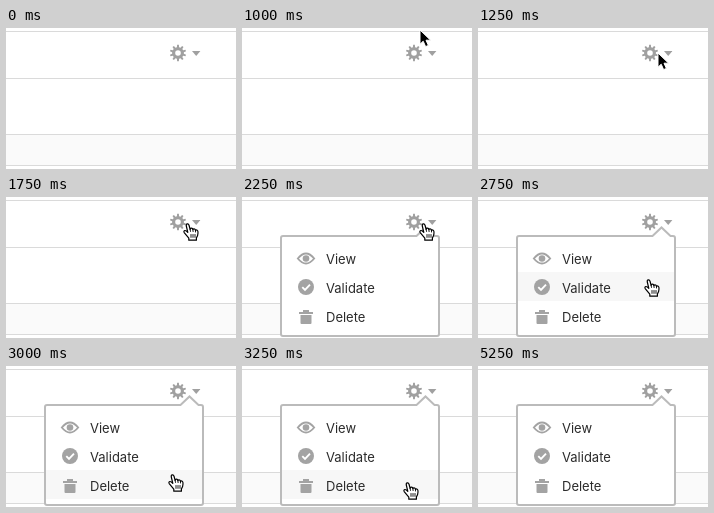
An HTML page that plays this animation: 230 by 141 pixels, repeating every 6.25 s.

```html
<!DOCTYPE html>
<html>
<head>
<meta charset="utf-8">
<style>
  html, body { margin: 0; width: 100%; height: 100%; overflow: hidden; background: #fff; }
  svg { display: block; }
  text { font: 13px Inter, Roboto, sans-serif; fill: #2b2b2b; }
</style>
</head>
<body>
<svg width="230" height="141" viewBox="0 0 230 141">
  <rect width="230" height="141" fill="#fff"/>
  <rect y="107" width="230" height="30" fill="#fafafa"/>
  <path d="M0 3.5H230M0 50.5H230M0 106.5H230M0 137.5H230" stroke="#dadada"/>

  <g fill="#a0a0a0">
    <path id="gear" fill-rule="evenodd"/>
    <path d="M186 23h8.4l-4.2 5z"/>
  </g>

  <g id="menu">
    <path d="M41 39H174.5L183.5 30.5L192.5 39H195Q197 39 197 41V137Q197 139 195 139H41Q39 139 39 137V41Q39 39 41 39Z"
      fill="#fff" stroke="#bbb" stroke-width="2"/>
    <rect id="row" x="40" width="156" height="29" fill="#f7f7f7"/>
    <g fill="#a3a3a3">
      <path d="M55.8 61.5Q64 51.5 72.2 61.5Q64 71.5 55.8 61.5Z" fill="none" stroke="#a3a3a3" stroke-width="1.8"/>
      <circle cx="64" cy="61.5" r="3.3"/>
      <circle cx="64" cy="90" r="8"/>
      <path d="M60.3 90.2l2.7 2.7l5-5.2" fill="none" stroke="#fff" stroke-width="1.9"/>
      <path d="M57 115h4v-2h6v2h4v2h-14zM58.5 118h11v8q0 1-1 1h-9q-1 0-1-1z"/>
    </g>
    <text x="84" y="67">View</text>
    <text x="84" y="96">Validate</text>
    <text x="84" y="125">Delete</text>
  </g>

  <path id="arrow" d="M1 1V15.2L4.2 12.2L6.6 17.6L9.4 16.4L7 11.2H11.6Z" fill="#000" stroke="#fff"/>
  <g id="hand" stroke="#000" stroke-linejoin="round" stroke-linecap="round">
    <path d="M5.8 17.2V15.2L3.5 12.4L1.2 9.6Q.4 8 1.8 7.5Q3 7.3 4.8 9.4L3.3 3Q2.9 1 4.3 .8Q5.6 .6 6.1 2.5L7.1 6.3Q7.3 5.1 8.5 5.2Q9.7 5.3 9.9 6.6Q10.3 5.6 11.3 5.9Q12.4 6.2 12.5 7.4Q13.2 6.6 14.2 7.2Q15.2 7.8 15 10L14.6 12.5L13.4 15V17.2Z"
      fill="#fff" stroke-width="1.2"/>
    <path d="M7.1 6.3L7.5 8.4M9.9 6.6L10.1 8.6M12.5 7.4V9M8 11.5V14.4M10 11.5V14.4M12 11.5V14.4" fill="none" stroke-width=".9"/>
  </g>
</svg>
<script>
  const el = id => document.getElementById(id);
  const LOOP = 6250;

  // start time, cursor, cursor x, cursor y, menu open, top of the lit row
  const steps = [
    [0],
    [1000, 'arrow', 177, 1],
    [1250, 'arrow', 179, 24],
    [1500, 'hand', 175, 26],
    [1750, 'hand', 177, 26],
    [2250, 'hand', 177, 26, true],
    [2500, 'hand', 173, 26, true],
    [2750, 'hand', 166, 82, true, 75],
    [3000, 'hand', 162, 108, true, 104],
    [3250, 'hand', 161, 116, true, 104],
    [5250, '', 0, 0, true]
  ];

  function gearPath(cx, cy, teeth) {
    const points = [];
    const add = (r, turn) => {
      const a = turn / teeth * 2 * Math.PI - Math.PI / 2;
      points.push((cx + r * Math.cos(a)).toFixed(2) + ' ' + (cy + r * Math.sin(a)).toFixed(2));
    };
    for (let i = 0; i < teeth; i++) {
      add(5.9, i - .3);
      add(8.2, i - .17);
      add(8.2, i + .17);
      add(5.9, i + .3);
    }
    return `M${points.join('L')}ZM${cx - 2.8} ${cy}a2.8 2.8 0 1 0 5.6 0a2.8 2.8 0 1 0 -5.6 0Z`;
  }

  const show = (node, on) => node.style.display = on ? '' : 'none';

  function draw(now) {
    const t = now % LOOP;
    const [, cursor, x, y, open, lit] = steps.filter(s => s[0] <= t).pop();
    show(el('menu'), open);
    show(el('row'), lit);
    if (lit) el('row').setAttribute('y', lit);
    for (const id of ['arrow', 'hand']) {
      show(el(id), id === cursor);
      if (id === cursor) el(id).setAttribute('transform', `translate(${x} ${y})`);
    }
  }

  el('gear').setAttribute('d', gearPath(172, 25, 10));
  const start = performance.now();
  function tick() {
    draw(performance.now() - start);
    requestAnimationFrame(tick);
  }
  tick();
</script>
</body>
</html>
```
